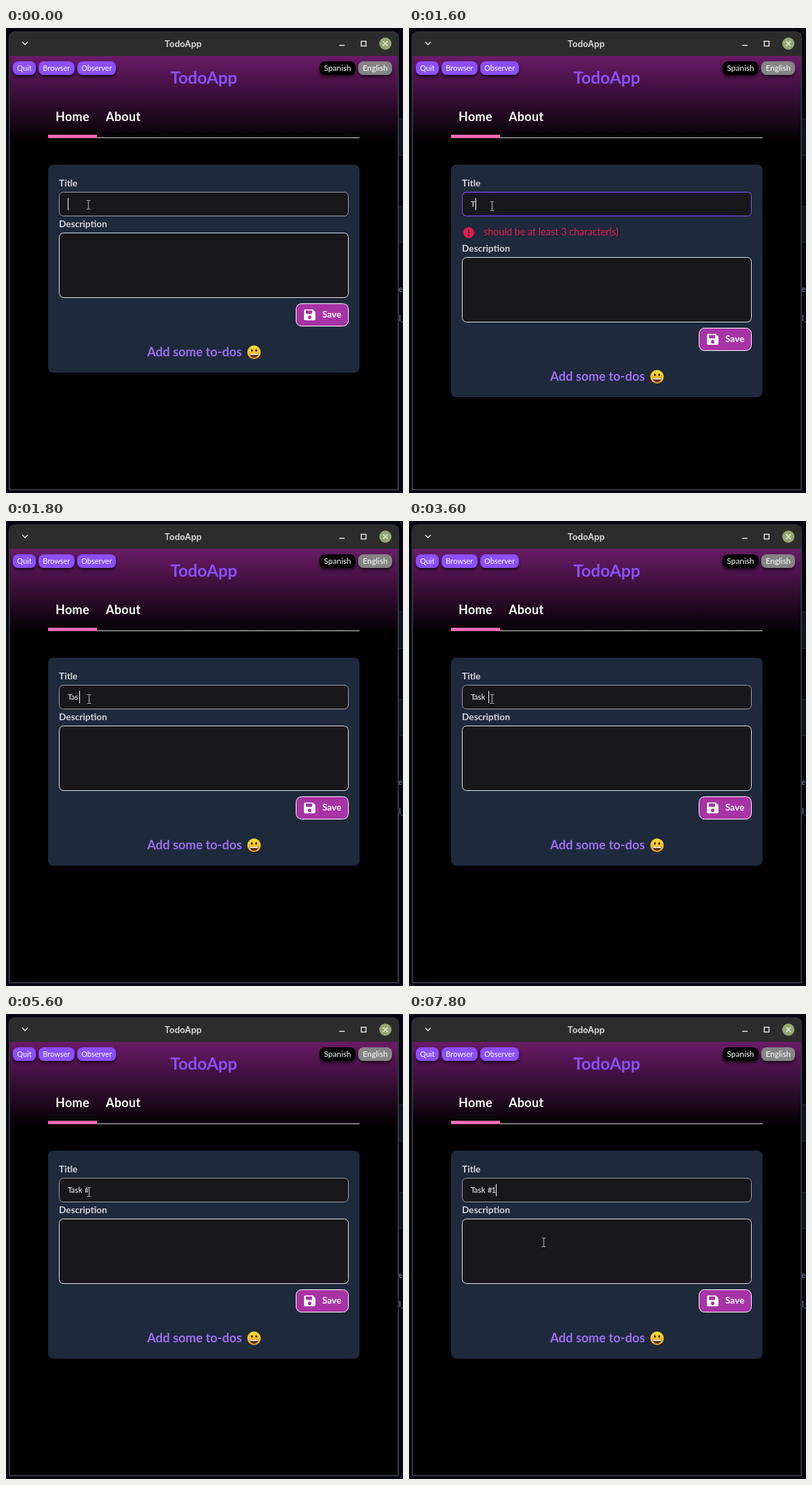
An HTML page that plays this animation: 585 px wide and 684 px high, repeating every 8 s.

```html
<!DOCTYPE html>
<html lang="en">
<head>
<meta charset="utf-8">
<title>TodoApp</title>
<style>
html, body { margin: 0; width: 100%; height: 100%; overflow: hidden; background: #05060f; }
svg { display: block; width: 585px; height: 684px; font-family: Lato, sans-serif; }
text { white-space: pre; }
.mid { text-anchor: middle; }
.bold { font-weight: 700; }
.pill { font-size: 11px; fill: #fff; }
.lang { font-size: 11.8px; fill: #fff; }
.nav { font-size: 18px; letter-spacing: .3px; fill: #fff; }
.label { font-size: 13.7px; fill: #d4d4d8; }
.typed { font-size: 11.5px; fill: #f4f4f5; }

/* The whole loop is 8 s, so 1.25% is one 100 ms step. */
.anim, .typed tspan { animation: 8s step-end infinite; }
#lower { animation-name: lower; }
#card { animation-name: grow; }
#error { animation-name: error; }
#title { animation-name: focus; }
#caret { animation-name: advance; }
#blink { animation-name: blink; }
#mouse { animation-name: mouse; }
#beam { animation-name: beam; }
#arrow { animation-name: arrow; }
#k1 { animation-name: k1; }
#k2 { animation-name: k2; }
#k3 { animation-name: k3; }
#k4 { animation-name: k4; }
#k5 { animation-name: k5; }
#k6 { animation-name: k6; }

@keyframes lower { 0%, 22.5%, 100% { transform: translateY(0); } 20% { transform: translateY(36px); } }
@keyframes grow { 0%, 22.5%, 100% { height: 306px; } 20% { height: 342px; } }
@keyframes error { 0%, 22.5%, 100% { opacity: 0; } 20% { opacity: 1; } }
@keyframes focus { 0%, 22.5%, 100% { stroke: #a1a1aa; } 20% { stroke: #8b5cf6; } }

@keyframes k1 { 0% { fill-opacity: 0; } 18.75%, 100% { fill-opacity: 1; } }
@keyframes k2 { 0% { fill-opacity: 0; } 21.25%, 100% { fill-opacity: 1; } }
@keyframes k3 { 0% { fill-opacity: 0; } 22.5%, 100% { fill-opacity: 1; } }
@keyframes k4 { 0% { fill-opacity: 0; } 40%, 100% { fill-opacity: 1; } }
@keyframes k5 { 0% { fill-opacity: 0; } 62.5%, 100% { fill-opacity: 1; } }
@keyframes k6 { 0% { fill-opacity: 0; } 81.25%, 100% { fill-opacity: 1; } }

@keyframes advance {
  0% { transform: translateX(91px); }
  18.75% { transform: translateX(98px); }
  21.25% { transform: translateX(103px); }
  22.5% { transform: translateX(108px); }
  40% { transform: translateX(114px); }
  45% { transform: translateX(117px); }
  62.5% { transform: translateX(125px); }
  81.25%, 100% { transform: translateX(128px); }
}
@keyframes blink {
  0%, 16.25%, 37.5%, 60%, 77.5%, 96.25%, 100% { opacity: 1; }
  8.75%, 30%, 52.5%, 70%, 88.75% { opacity: 0; }
}
@keyframes mouse {
  0% { transform: translate(121.5px, 260px); }
  2.5% { transform: translate(122.5px, 261px); }
  3.75% { transform: translate(122.5px, 262px); }
  86.25% { transform: translate(160px, 292px); }
  87.5% { transform: translate(290px, 385px); }
  88.75% { transform: translate(369px, 443px); }
  92.5% { transform: translate(362px, 478px); }
  93.75% { transform: translate(325px, 450px); }
  95% { transform: translate(250px, 384px); }
  96.25% { transform: translate(210px, 346px); }
  97.5%, 100% { transform: translate(198.5px, 336px); }
}
@keyframes beam { 0%, 95%, 100% { opacity: 1; } 88.75% { opacity: 0; } }
@keyframes arrow { 0%, 95%, 100% { opacity: 0; } 88.75% { opacity: 1; } }
</style>
</head>
<body>
<svg viewBox="0 0 585 684">
  <defs>
    <linearGradient id="sky" x2="0" y2="1">
      <stop stop-color="#6a1b67"/><stop offset="1" stop-color="#000"/>
    </linearGradient>
    <linearGradient id="face" x2="0" y2="1">
      <stop stop-color="#fde030"/><stop offset="1" stop-color="#f7a51e"/>
    </linearGradient>
    <filter id="shadow" x="-20%" y="-20%" width="140%" height="170%">
      <feDropShadow dx="0" dy="3" stdDeviation="2" flood-color="#000" flood-opacity=".65"/>
    </filter>
  </defs>

  <!-- Desktop behind the window -->
  <rect width="585" height="684" fill="#05060f"/>
  <path d="M579 134h6v53h-6zM579 262h6v54h-6z" fill="#0d1520"/>
  <path d="M579 133.5h6M579 187.5h6M579 262.5h6M579 315.5h6" stroke="#1f2733"/>
  <g font-size="12" fill="#7d88b5">
    <text x="578" y="388">e_</text><text x="579" y="431">l_</text>
  </g>

  <!-- Window frame and title bar -->
  <path d="M5 679V15Q5 6 14 6H569Q578 6 578 15V679Z" fill="#000" stroke="#34353c" stroke-width="2"/>
  <path d="M5 41V15Q5 6 14 6H569Q578 6 578 15V41Z" fill="#2c2c2c"/>
  <text class="mid" x="261" y="28" font-family="Inter, sans-serif" font-size="12.6" font-weight="600" fill="#dedede">TodoApp</text>
  <g fill="none" stroke="#eee" stroke-width="1.4">
    <path d="M24 20.5l4 4 4-4"/>
    <path d="M491 25.5h8"/>
    <rect x="523.5" y="19.5" width="7" height="7"/>
    <circle cx="559" cy="23" r="9" fill="#93a870" stroke="none"/>
    <path d="M555.5 19.5l7 7m0-7l-7 7"/>
  </g>

  <!-- Page header -->
  <rect x="6" y="41" width="571" height="126" fill="url(#sky)"/>
  <g filter="url(#shadow)">
    <g fill="#8b50fc">
      <rect x="10" y="49" width="34" height="20" rx="8"/>
      <rect x="48" y="49" width="53" height="20" rx="8"/>
      <rect x="105" y="49" width="57" height="20" rx="8"/>
    </g>
    <rect x="462" y="49" width="53" height="20" rx="8"/>
    <rect x="519" y="49" width="50" height="20" rx="8" fill="#858585"/>
  </g>
  <g class="pill mid">
    <text x="27" y="63">Quit</text><text x="74.3" y="63">Browser</text><text x="133.5" y="63">Observer</text>
  </g>
  <g class="lang mid">
    <text x="488.5" y="63">Spanish</text><text x="544" y="63">English</text>
  </g>
  <text class="mid bold" x="291.5" y="81.5" font-size="24.6" fill="#8b50fc">TodoApp</text>
  <g class="nav mid bold">
    <text x="98" y="137">Home</text><text x="172.7" y="137">About</text>
  </g>
  <path d="M134 161.5H521" stroke="#d4d4d8"/>
  <rect x="62" y="157" width="72" height="5" fill="#ff69b4"/>

  <!-- Form -->
  <rect id="card" class="anim" x="62" y="201" width="459" height="306" rx="8" fill="#1e293b"/>
  <text class="label bold" x="78" y="233">Title</text>
  <rect id="title" class="anim" x="78.5" y="241.5" width="426" height="35" rx="6" fill="#18181b" stroke="#a1a1aa"/>
  <text class="typed" x="91" y="263"><tspan id="k1">T</tspan><tspan id="k2" dx="-.8">a</tspan><tspan id="k3">s</tspan><tspan id="k4">k</tspan> <tspan id="k5" dx=".6">#</tspan><tspan id="k6" dx="-1">1</tspan></text>
  <g id="caret" class="anim"><rect id="blink" class="anim" y="250" width="1" height="18" fill="#fff"/></g>

  <g id="error" class="anim">
    <circle cx="88" cy="301" r="8" fill="#e11d48"/>
    <path d="M88 296.5v5M88 304v2" stroke="#1e293b" stroke-width="2"/>
    <text x="110" y="305" font-size="14.4" fill="#e11d48">should be at least 3 character(s)</text>
  </g>

  <g id="lower" class="anim">
    <text class="label bold" x="78" y="293">Description</text>
    <rect x="78.5" y="301.5" width="426" height="95" rx="6" fill="#18181b" stroke="#e4e4e7"/>
    <rect x="427.5" y="405.5" width="77" height="33" rx="8" fill="#a733a5" stroke="#fff"/>
    <path fill="#fff" fill-rule="evenodd" d="M441 414h11l4 4v10q0 2-2 2h-13q-2 0-2-2v-12q0-2 2-2zM442 415.5v5h9v-5zM447.5 423a2.6 2.6 0 1 0 .01 0z"/>
    <text class="bold" x="466" y="426" font-size="13.6" fill="#fff">Save</text>
    <text class="bold" x="208" y="483" font-size="18.4" fill="#9d6ef0">Add some to-dos</text>
    <g transform="translate(365.5 477)">
      <circle r="10" fill="url(#face)"/>
      <path d="M-6.5 1.5Q0 3 6.5 1.5Q6 8 0 8T-6.5 1.5Z" fill="#5b2f1d"/>
      <path d="M-6 1.8Q0 3 6 1.8L5.4 4H-5.4Z" fill="#fff"/>
      <g fill="#422b0d"><ellipse cx="-3.2" cy="-2.8" rx="1.4" ry="2"/><ellipse cx="3.2" cy="-2.8" rx="1.4" ry="2"/></g>
    </g>
  </g>

  <g id="mouse" class="anim">
    <g id="beam" class="anim" fill="none">
      <path d="M-2.5-6.5h5M-2.5 6.5h5M0-6.5v13" stroke="#000" stroke-width="3"/>
      <path d="M-2.5-6.5h2M.5-6.5h2M-2.5 6.5h2M.5 6.5h2M0-6v12" stroke="#fff"/>
    </g>
    <path id="arrow" class="anim" d="M.5.5v13.5l3.2-3 2.2 5 2.2-1-2.2-4.7h4.4z" fill="#000" stroke="#fff"/>
  </g>
</svg>
</body>
</html>
```
